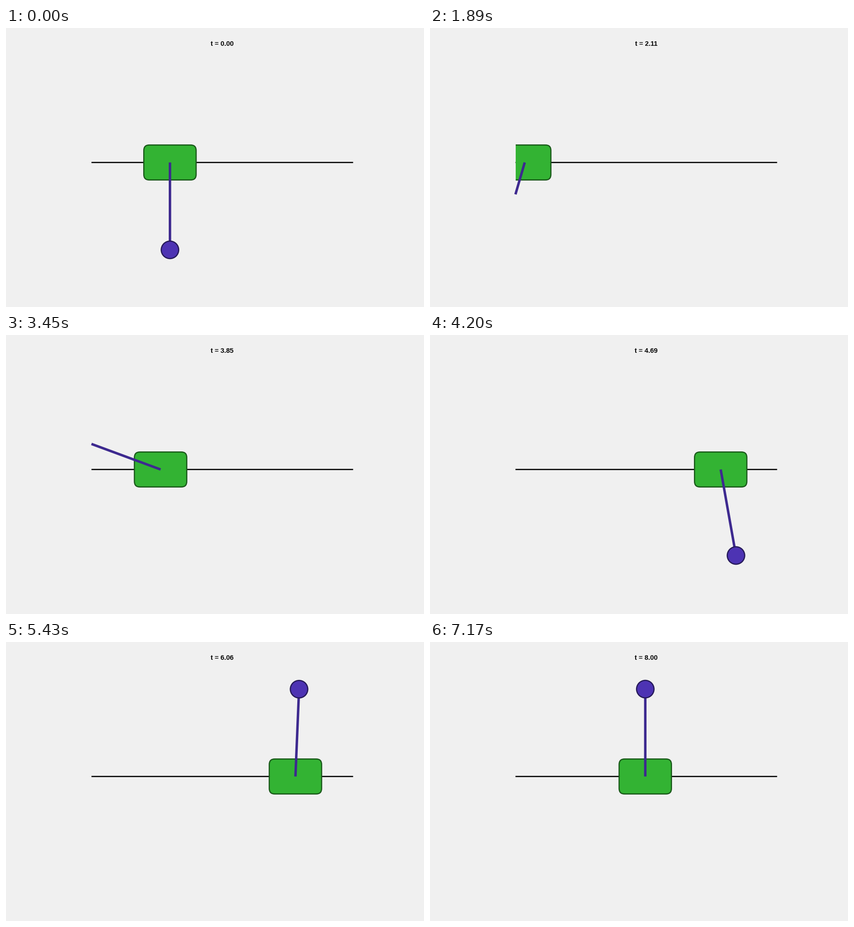
Write a matplotlib script that moves like this. It is 917 px wide and 611 px high and loops after 7200 ms.

```python
import numpy as np
import matplotlib.pyplot as plt
from matplotlib.animation import FuncAnimation
from matplotlib.patches import Circle, FancyBboxPatch, Rectangle

W, H = 917, 611
FRAMES, T_END = 240, 8.0
SCALE = 574 / 3                    # pixels per metre
LEFT, RIGHT = 187.5, 761.5
MID, RAIL = (LEFT + RIGHT) / 2, 294.5
CART_W, CART_H = 0.6 * SCALE, 0.4 * SCALE
PX = 0.72                          # points per pixel at 100 dpi
EDGE = 2.6 * PX


def settle(t0, start, goal, rate):
    """Keys of an exponential approach from start to goal."""
    return [(t, goal + (start - goal) * np.exp(-rate * (t - t0)))
            for t in np.linspace(t0, T_END, 12)]


def smooth(keys, t):
    """Cubic Hermite curve through (time, value) keys."""
    kt, kv = np.array(keys, float).T
    slope = np.gradient(kv, kt)
    slope[0] = 0
    i = np.clip(np.searchsorted(kt, t, side="right") - 1, 0, len(kt) - 2)
    h = kt[i + 1] - kt[i]
    s = (t - kt[i]) / h
    return ((1 + 2 * s) * (1 - s) ** 2 * kv[i] + s * (1 - s) ** 2 * h * slope[i]
            + s * s * (3 - 2 * s) * kv[i + 1] + s * s * (s - 1) * h * slope[i + 1])


# Swing-up through a few poses, then the balance settles
cart_keys = [(0, -.6), (.85, -.29), (1.172, -.446), (1.674, -.903),
             (2.109, -1.394), (2.8, -1.13), (3.3, -1.2), (3.849, -.708),
             (4.686, .853), (5.2, .353), (5.7, 1.33)]
pole_keys = [(0, 0), (1.172, -.0135), (2.109, -.283), (2.5, 0), (2.95, .58),
             (3.36, -.02), (3.849, -1.923), (4.12, -2.45), (4.42, -1.6),
             (4.686, .175)]
times = np.linspace(0, T_END, FRAMES)
cart_x = MID + SCALE * smooth(cart_keys + settle(6.059, .838, -.015, 2.85), times)
angle = smooth(pole_keys + settle(5.0, 1.83, np.pi, 3.27), times)

fig = plt.figure(figsize=(W / 100, H / 100), dpi=100, facecolor="#f0f0f0")
ax = fig.add_axes([0, 0, 1, 1])
ax.set_xlim(0, W)
ax.set_ylim(H, 0)
ax.axis("off")


def bar(color, width, z):
    return ax.plot([], [], color=color, lw=width, solid_capstyle="butt",
                   snap=False, zorder=z)[0]


track = bar("black", EDGE, 1)
track.set_data([LEFT, RIGHT], [RAIL, RAIL])
cart = FancyBboxPatch((0, RAIL - CART_H / 2), CART_W, CART_H,
                      boxstyle="round,pad=0,rounding_size=12",
                      fc="#33b333", ec="#1a591a", lw=EDGE, zorder=2)
rod = bar("#3d298f", 5.4 * PX, 3)
bob = Circle((0, 0), 0.1 * SCALE, fc="#4d33b3", ec="#261a59",
             lw=EDGE, zorder=4)
for part in (cart, bob):
    ax.add_patch(part)
    part.set_clip_path(Rectangle((LEFT, 0), RIGHT - LEFT, H,
                                 transform=ax.transData))
label = ax.text(MID, 39, "", ha="center", va="baseline", color="black",
                family="Liberation Sans", weight="bold", size=14.67 * PX)


def update(i):
    x, a = cart_x[i], angle[i]
    dx, dy = SCALE * np.sin(a), SCALE * np.cos(a)
    # The rod is cut square where it leaves the view
    edge = np.clip(x + dx, LEFT, RIGHT)
    cut = 1 if edge == x + dx else (edge - x) / dx
    cart.set_x(x - CART_W / 2)
    rod.set_data([x, x + cut * dx], [RAIL, RAIL + cut * dy])
    bob.center = x + dx, RAIL + dy
    label.set_text(f"t = {times[i]:.2f}")
    return cart, rod, bob, label


anim = FuncAnimation(fig, update, frames=FRAMES, interval=30,
                     repeat=True, repeat_delay=0)
plt.show()
```
